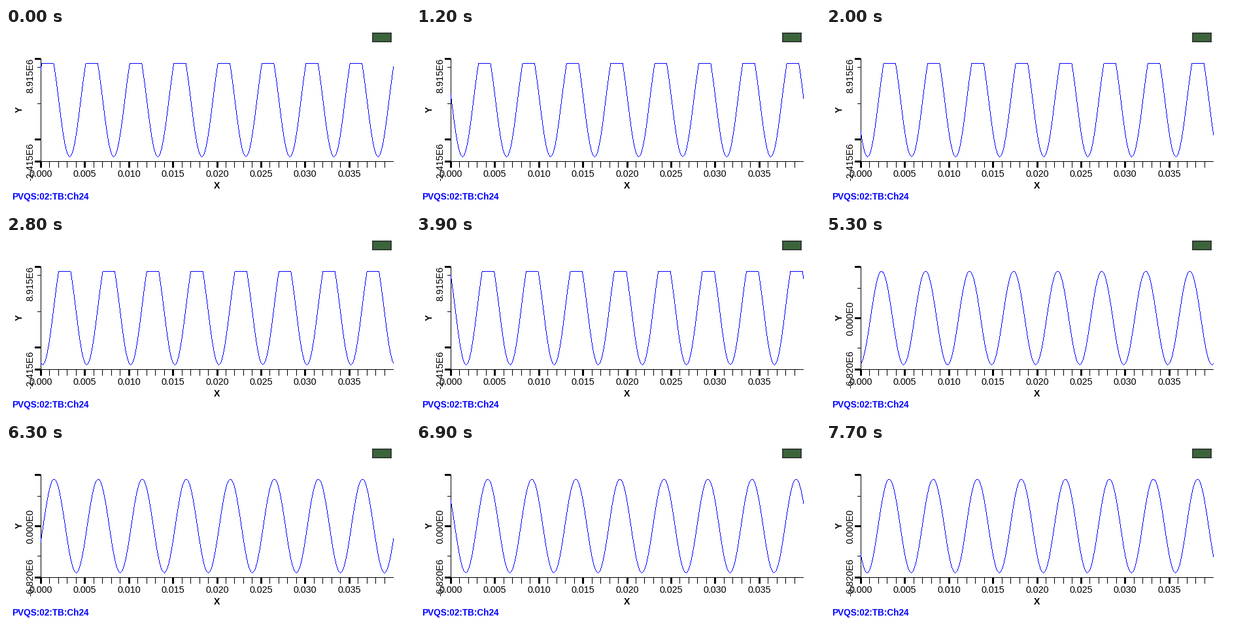
Animation, 618 px wide and 277 px high, one loop 8000 ms. Source, as a matplotlib script:

```python
import numpy as np
import matplotlib
import matplotlib.pyplot as plt
from matplotlib.animation import FuncAnimation
from matplotlib.patches import Rectangle

W, H, DPI = 618, 277, 100
LEFT, RIGHT, TOP, BOTTOM = 53, 592, 47, 205
INTERVAL, FRAMES = 100, 80
PX = 72 / DPI                # points per pixel

AMPLITUDE = 6.2              # signal values in millions
CLIP = 8.4
PERIOD = (RIGHT - LEFT) / 8  # pixels per wave

# Signal state per acquisition: first trough position and DC offset.
TROUGH_AT = [0, 5, 11, 15, 20, 24, 29]
TROUGH_X = [97.0, 205.4, 325.1, 413.1, 522.4, 578.5, 668.9]
OFFSET_AT = [15, 16, 17, 18, 19]
OFFSET = [4.3, 1.2, 0.33, 0.09, 0.0]

matplotlib.rcParams["font.family"] = "Liberation Sans"

fig = plt.figure(figsize=(W / DPI, H / DPI), dpi=DPI, facecolor="white")
ax = fig.add_axes([0, 0, 1, 1])
ax.axis("off")


def label(x, y, text, size=14.4, **kw):
    kw = {"ha": "center", "color": "black", **kw}
    return ax.text(x, y, text, fontsize=size * PX, va="baseline",
                   rotation_mode="anchor", **kw)


def block(x, y, w, h, color="black"):
    return ax.add_patch(Rectangle((x, y), w, h, fc=color, lw=0,
                                  antialiased=False))


def draw_static():
    block(560, 7, 30, 15, "#333d35")
    block(562, 9, 26, 11, "#3c643c")
    block(LEFT, TOP, 1, BOTTOM - TOP + 1)
    block(LEFT, BOTTOM, RIGHT - LEFT + 1, 1)
    for i in range(40):
        x = LEFT + int((RIGHT - LEFT) * i / 40 + 0.5)
        if i % 5:
            block(x, BOTTOM, 1, 10)
        else:
            block(x - 1, BOTTOM, 3, 10)
            label(x + 0.5, 229, f"{i / 1000:.3f}")
    for y in (TOP, BOTTOM):
        block(44, y - 1, 9, 3)
    label(322.5, 247, "X", 14, weight="bold")
    label(25, 125.5, "Y", 14, weight="bold", rotation=90)
    label(9.5, 264, "PVQS:02:TB:Ch24", 13.6, weight="bold",
          color="blue", ha="left")


draw_static()
zero_tick = block(44, 0, 9, 3)
minor_ticks = {value: block(48, 0, 5, 1) for value in (-4, 4, 8)}
y_labels = [label(41.5, 0, "", rotation=90) for _ in range(3)]

columns = np.arange(LEFT, RIGHT + 1)
edges = np.arange(LEFT, RIGHT + 2) - 0.5
rows = np.arange(H)[:, None]
canvas = np.zeros((H, W, 4), np.uint8)
canvas[..., 2] = 255
trace = ax.imshow(canvas, extent=(0, W, H, 0), aspect="auto",
                  interpolation="nearest", zorder=2.5)
ax.set_xlim(0, W)
ax.set_ylim(H, 0)


def draw(frame):
    shot = (frame * INTERVAL - 60) // 271 + 1
    trough = np.interp(shot, TROUGH_AT, TROUGH_X)
    offset = np.interp(shot, OFFSET_AT, OFFSET)

    low, high = offset - AMPLITUDE, min(offset + AMPLITUDE, CLIP)
    margin = 0.05 * (high - low)
    low, high = low - margin, high + margin

    def to_y(value):
        return np.round(TOP + (BOTTOM - TOP) * (high - value) / (high - low))

    # A crisp one-pixel trace: each column spans the rows it crosses.
    wave = offset - AMPLITUDE * np.cos(2 * np.pi * (edges - trough) / PERIOD)
    y = to_y(np.minimum(wave, CLIP))
    first = np.minimum(y[:-1], y[1:])
    last = np.maximum(np.maximum(y[:-1], y[1:]) - 1, first)
    canvas[:, columns, 3] = 255 * ((rows >= first) & (rows <= last))
    trace.set_data(canvas)

    zero = to_y(0)
    zero_tick.set_y(zero - 1)
    for value, tick in minor_ticks.items():
        tick.set_y(to_y(value))
        tick.set_visible(bool(low < value < high))

    # Labels that would collide are left out.
    show_zero = zero + 27 < BOTTOM - 29
    show_high = not show_zero or zero - 27 > TOP + 60
    texts = [(f"{low:.3f}E6", BOTTOM, True),
             ("0.000E0", zero, show_zero),
             (f"{high:.3f}E6", TOP + 26, show_high)]
    for item, (text, pos, visible) in zip(y_labels, texts):
        item.set_text(text)
        item.set_y(pos + 0.5)
        item.set_visible(bool(visible))
    return trace, zero_tick, *minor_ticks.values(), *y_labels


anim = FuncAnimation(fig, draw, frames=FRAMES, interval=INTERVAL,
                     repeat=True, repeat_delay=0, blit=False)
plt.show()
```
